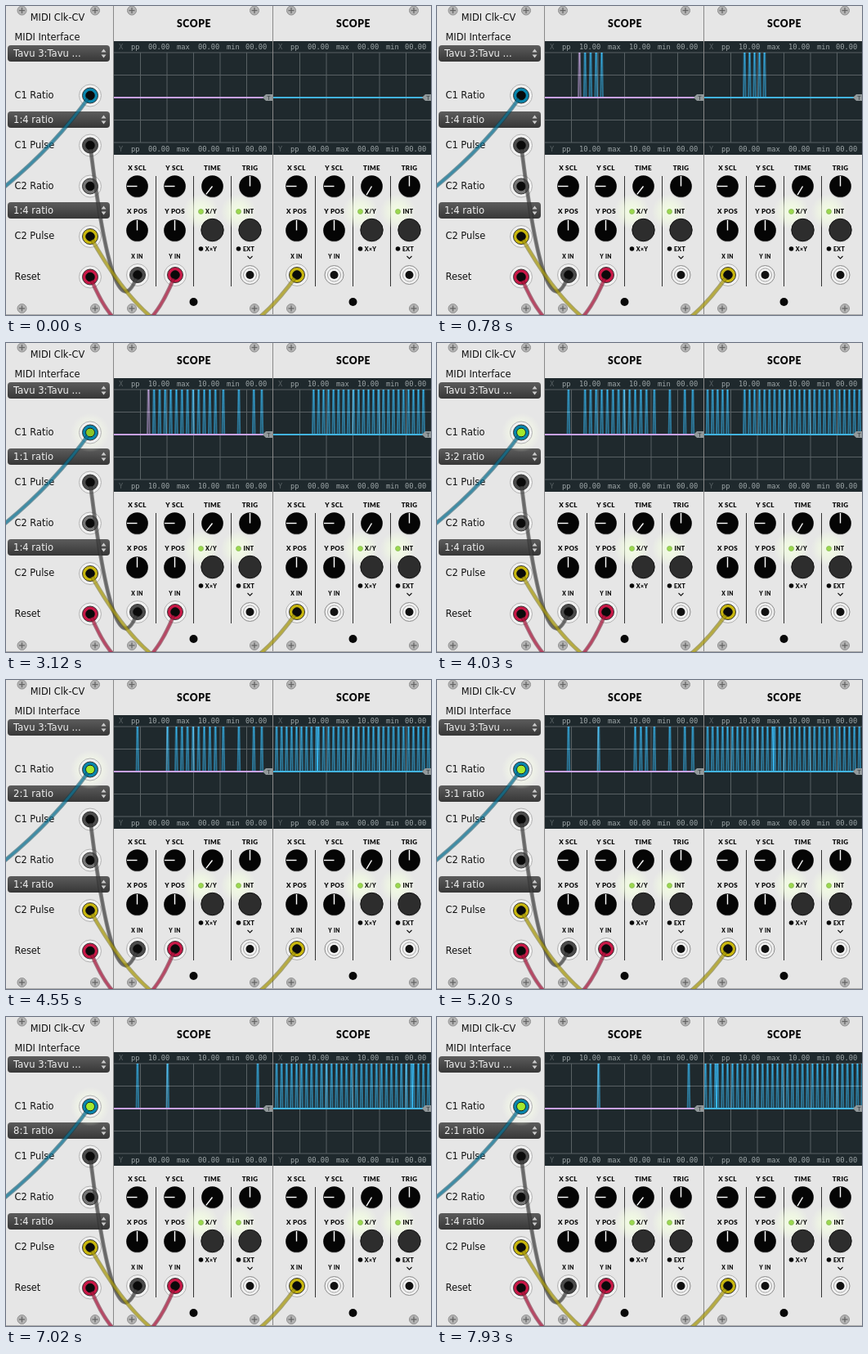
Animation of 520x378 px, one loop 8 s. Source, as an HTML page with a canvas:

```html
<!DOCTYPE html>
<html lang="en">
<head>
<meta charset="utf-8">
<title>Clock module and two scopes</title>
<style>
html, body { margin: 0; width: 100%; height: 100%; overflow: hidden; background: #e6e6e6; }
canvas { display: block; }
</style>
</head>
<body>
<canvas id="stage" width="520" height="378"></canvas>
<script>
const ctx = document.getElementById('stage').getContext('2d');
const LOOP = 8000, STEP = 130;
const CLOCK_START = 235, CLOCK_GAP = 130;
const SANS = '"DejaVu Sans", sans-serif';
const MONO = '"DejaVu Sans Mono", monospace';
const LATO = 'Lato, sans-serif';

const TEAL = [9, 134, 173], GREY = [76, 76, 76], YELLOW = [201, 183, 14], RED = [201, 24, 71];
const rgb = c => `rgb(${c.map(Math.round)})`;

const RATIOS = [[0, '1:4'], [1820, '1:3'], [2080, '1:2'], [2210, '2:3'], [2860, '1:1'], [3250, '3:2'],
  [4160, '2:1'], [4940, '3:1'], [5330, '4:1'], [5850, '8:1'], [7540, '4:1'], [7800, '2:1']];

const steadyPulses = n => Array.from({ length: n }, (_, k) => CLOCK_START + k * CLOCK_GAP);
const SCOPES = [
  { x: 132, start: 174.3, speed: 0.0525, sweep: 195.2, dual: true, timeAngle: 218,
    pulses: [...steadyPulses(13), 1980, 2342, 2690, 2876, 3698, 4400, 6500] },
  { x: 327, start: 376.3, speed: 0.047, sweep: 198, dual: false, timeAngle: 211, pulses: steadyPulses(60) }
];

function text(str, x, y, font, color = '#111', align = 'left') {
  ctx.font = font;
  ctx.fillStyle = color;
  ctx.textAlign = align;
  ctx.fillText(str, x, y);
}

function disc(x, y, r, fill, stroke, width = 1) {
  ctx.beginPath();
  ctx.arc(x, y, r, 0, 7);
  if (fill) { ctx.fillStyle = fill; ctx.fill(); }
  if (stroke) { ctx.strokeStyle = stroke; ctx.lineWidth = width; ctx.stroke(); }
}

function line(points, color, width = 1) {
  ctx.beginPath();
  for (const [x, y] of points) ctx.lineTo(x, y);
  ctx.strokeStyle = color;
  ctx.lineWidth = width;
  ctx.stroke();
}

function polygon(points, color) {
  ctx.beginPath();
  for (const [x, y] of points) ctx.lineTo(x, y);
  ctx.fillStyle = color;
  ctx.fill();
}

function glow(x, y, r, color, alpha) {
  const g = ctx.createRadialGradient(x, y, 0, x, y, r);
  g.addColorStop(0, `rgba(${color},${alpha})`);
  g.addColorStop(0.5, `rgba(${color},${alpha * 0.6})`);
  g.addColorStop(1, `rgba(${color},0)`);
  disc(x, y, r, g);
}

function screw(x, y) {
  disc(x, y, 5.5, '#b4b4b4', '#909090');
  line([[x - 3.5, y], [x + 3.5, y]], '#666', 1.3);
  line([[x, y - 3.5], [x, y + 3.5]], '#666', 1.3);
}

function jack(x, y) {
  disc(x, y, 11.5, '#f0f0f0', '#8a8a8a');
  disc(x, y, 8, '#f4f4f4', '#a4a4a4');
  disc(x, y, 5, '#111');
}

function plug(x, y, color, hole = '#0a0a0a') {
  disc(x, y, 13.5, '#f1f1f1', '#b2b2b2');
  disc(x, y, 9.5, rgb(color), '#333');
  disc(x, y, 5.3, hole, '#111');
}

// Translucent cable with a darker outline.
function drawCable(path, color) {
  ctx.globalAlpha = 0.5;
  for (const [width, shade] of [[5, 0.5], [3, 1]]) {
    ctx.lineWidth = width;
    ctx.strokeStyle = rgb(color.map(v => v * shade));
    ctx.stroke(new Path2D(path));
  }
  ctx.globalAlpha = 1;
}

function hangingCable([x1, y1], [x2, y2], color) {
  const slump = (150 + Math.hypot(x2 - x1, y2 - y1)) / 2;
  drawCable(`M${x1} ${y1}Q${(x1 + x2) / 2} ${(y1 + y2) / 2 + slump} ${x2} ${y2}`, color);
}

function dropdown(y, label) {
  const g = ctx.createLinearGradient(0, y, 0, y + 20);
  g.addColorStop(0, '#5c5c5c');
  g.addColorStop(1, '#373737');
  ctx.beginPath();
  ctx.roundRect(2, y, 125, 20, 4);
  ctx.fillStyle = g;
  ctx.fill();
  text(label, 9, y + 14.3, '11.6px ' + SANS, '#f0f0f0');
  polygon([[116.5, y + 8.5], [122.5, y + 8.5], [119.5, y + 4.5]], '#ccc');
  polygon([[116.5, y + 11.5], [122.5, y + 11.5], [119.5, y + 15.5]], '#ccc');
}

function knob(x, y, angle) {
  disc(x, y + 1, 13.5, 'rgba(0,0,0,.15)');
  disc(x, y, 13.3, '#050505');
  const a = angle * Math.PI / 180;
  line([[x, y], [x + Math.sin(a) * 12.5, y - Math.cos(a) * 12.5]], '#fff', 1.4);
}

function clockPanel(t) {
  const label = (str, y) => text(str, 10.5, y, '11.4px ' + SANS);
  text('MIDI Clk-CV', 63, 17.5, '11.4px ' + SANS, '#111', 'center');
  label('MIDI Interface', 42);
  label('C1 Ratio', 113);
  label('C1 Pulse', 174);
  label('C2 Ratio', 224);
  label('C2 Pulse', 285);
  label('Reset', 335);
  dropdown(48, 'Tavu 3:Tavu ...');
  dropdown(129, RATIOS.findLast(r => r[0] <= t)[1] + ' ratio');
  dropdown(240, '1:4 ratio');
  for (const x of [19.5, 109]) { screw(x, 5.5); screw(x, 370); }
}

function readout(scope, y, name, high) {
  const value = high ? '10.00' : '00.00';
  const put = (str, dx, color = '#a0a8aa') => text(str, scope.x + dx, y, '8.7px ' + MONO, color);
  put(name, 6, '#586164');
  put('pp', 21);
  put(value, 42);
  put('max', 77);
  put(value, 103);
  put('min', 138);
  put('00.00', 161);
}

function drawPulse(px, color) {
  ctx.globalCompositeOperation = 'lighter';
  for (const side of [-1, 1]) line([[px + side * 1.3, 112], [px + side * 0.5, 57]], color, 1.9);
  ctx.globalCompositeOperation = 'source-over';
}

function screen(scope, t) {
  const { x, start, speed, sweep, dual, pulses } = scope;
  ctx.save();
  ctx.beginPath();
  ctx.rect(x, 43, 195, 139);
  ctx.clip();
  ctx.fillStyle = '#1f292d';
  ctx.fillRect(x, 43, 195, 139);
  for (let i = 0; i < 5; i++) {
    const y = 57 + i * 27.5, gx = x + (i + 1) * 32.5;
    line([[x, y], [x + 195, y]], '#596164');
    line([[gx, 57], [gx, 167]], '#596164');
  }
  readout(scope, 53, 'X', t >= 260);
  readout(scope, 178, 'Y', dual && t >= 260 && t < 3960);

  // A pulse stays until the next sweep passes over it.
  pulses.forEach((p, i) => {
    if (p > t || t - p >= sweep / speed) return;
    const px = x + (start - x + speed * (p - CLOCK_START)) % sweep;
    drawPulse(px, dual && i === 0 ? 'rgb(88,66,95)' : 'rgb(12,76,105)');
  });
  line([[x, 112], [x + 195, 112]], dual ? '#c9a2f2' : '#42b4e0', 1.8);

  polygon([[x + 182, 112], [x + 186, 108], [x + 194, 108], [x + 194, 116], [x + 186, 116]], '#92999b');
  text('T', x + 189.5, 115, '7px ' + SANS, '#30383b', 'center');
  ctx.restore();
}

function scopePanel(scope, t) {
  const { x } = scope;
  const columns = [28.5, 74.5, 120.5, 166.5].map(dx => x + dx);
  const label = (str, cx, y, size) => text(str, cx, y, `900 ${size}px ${LATO}`, '#080808', 'center');
  line([[x - 0.5, 0], [x - 0.5, 378]], '#888');
  ctx.letterSpacing = '0.6px';
  label('SCOPE', x + 98, 26, 12.2);
  ctx.letterSpacing = '0px';
  for (const dx of [22, 172]) { screw(x + dx, 5.5); screw(x + dx, 370); }
  screen(scope, t);

  for (const dx of [51.5, 97.5, 143.5]) line([[x + dx, 208], [x + dx, 343]], '#333');
  ctx.letterSpacing = '0.3px';
  ['X SCL', 'Y SCL', 'TIME', 'TRIG'].forEach((s, i) => label(s, columns[i], 200.5, 8));
  ['X POS', 'Y POS'].forEach((s, i) => label(s, columns[i], 254, 8));
  [270, 270, scope.timeAngle, 0].forEach((a, i) => knob(columns[i], 220.5, a));
  for (const cx of columns.slice(0, 2)) knob(cx, 274.5, 0);
  [['X/Y', 'X×Y'], ['INT', 'EXT']].forEach(([on, off], i) => {
    const bx = columns[i + 2], lx = bx - 14;
    glow(lx, 251.5, 22, '244,255,226', 0.95);
    disc(lx, 251.5, 3, '#9bd84c', '#86b45c', 0.8);
    label(on, bx - 1.5, 254.3, 7);
    disc(bx, 275, 14, 'rgba(0,0,0,.15)');
    disc(bx, 274, 13.7, '#2d2d2d', '#111');
    disc(lx, 297, 2.8, '#080808');
    label(off, bx - 1.5, 299.5, 7);
  });
  label('X IN', columns[0], 309, 6.6);
  label('Y IN', columns[1], 309, 6.6);
  ctx.letterSpacing = '0px';
  const tx = columns[3];
  line([[tx - 3, 306], [tx, 309], [tx + 3, 306]], '#111', 1.1);
  jack(tx, 329);
  if (!scope.dual) jack(columns[1], 329);
  disc(x + 97.5, 362, 5, '#080808');
}

// Light inside the ratio input follows the rising control voltage.
function portLevel(t) {
  if (t < 1170) return 0;
  if (t < 1950) return 0.4 * (t - 1170) / 780;
  return Math.min(1, 0.4 + 0.45 * (t - 1950) / 1170);
}

function wiring(t) {
  const level = portLevel(t);
  const lamp = rgb([8 + 157 * level, 10 + 222 * level, 10 + 35 * level]);
  const resetLamp = t === 260 ? '#9ddc35' : '#0a0a0a';
  const ratio = [103, 109.5], pulse1 = [103, 170.5], ratio2 = [103, 220.5], pulse2 = [103, 282], reset = [103, 331.5];
  const xIn = [161, 329], yIn = [207, 329], xIn2 = [356, 329];
  const plugs = [[ratio, TEAL, lamp], [pulse1, GREY], [ratio2, [119, 119, 119]], [pulse2, YELLOW],
    [reset, RED, resetLamp], [xIn, GREY], [yIn, RED], [xIn2, YELLOW]];

  glow(...ratio, 24, '248,255,232', level);
  if (t === 260) glow(...reset, 22, '244,255,226', 0.8);
  for (const [at, color, hole] of plugs) plug(...at, color, hole);
  drawCable('M103 109.5Q58 173 -4 223', TEAL);
  hangingCable(pulse1, xIn, GREY);
  hangingCable(pulse2, xIn2, YELLOW);
  hangingCable(reset, yIn, RED);
  for (const [at, , hole = '#0a0a0a'] of plugs) disc(...at, 4.8, hole);
}

function draw(now) {
  const t = Math.floor(now % LOOP / STEP) * STEP;
  ctx.fillStyle = '#e6e6e6';
  ctx.fillRect(0, 0, 520, 378);
  clockPanel(t);
  for (const scope of SCOPES) scopePanel(scope, t);
  line([[0, 377.5], [520, 377.5]], '#aaa');
  wiring(t);
}

const begin = performance.now();
function tick() {
  draw(performance.now() - begin);
  requestAnimationFrame(tick);
}
tick();
</script>
</body>
</html>
```
